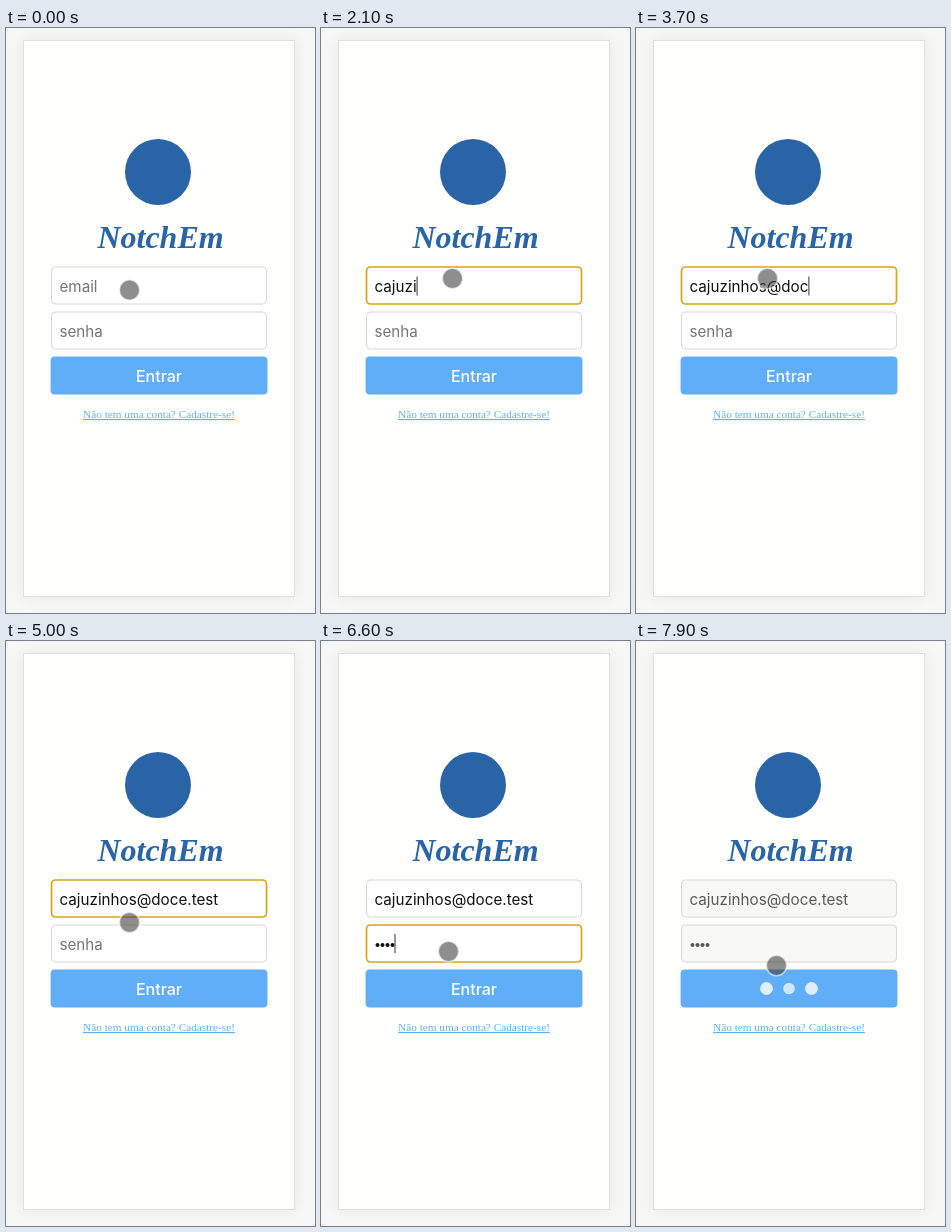
Recreate the animation shown at these times as an HTML page. Size 309 by 585 pixels, loop 8000 ms.

```html
<!DOCTYPE html>
<html lang="pt-BR">
<head>
<meta charset="utf-8">
<title>Login</title>
<style>
  html, body { margin: 0; width: 100%; height: 100%; overflow: hidden; background: #f7f8f6; }
  svg { display: block; width: 100vw; height: 100vh; }
  text { font: 15.2px Inter, sans-serif; }
  .brand { font: italic bold 32px "Liberation Serif", serif; fill: #2864a6; text-anchor: middle; }
  .button { font-size: 16px; font-weight: 500; fill: #fff; text-anchor: middle; }
  .link {
    font: 11.25px "Liberation Serif", serif; fill: #5fb2ee; text-anchor: middle;
    text-decoration: underline 1px; text-underline-offset: 1px;
  }
  .card { fill: #fefefc; stroke: #dfe1df; filter: drop-shadow(0 0 8px rgba(0, 0, 0, .06)); }
  .field { fill: #fff; stroke: #d6d9d7; }
  .field.focus { stroke: #d6a51c; stroke-width: 1.7; }
  .field.off { fill: #f8f8f7; }
</style>
</head>
<body>
<svg viewBox="0 0 309 585">
  <rect class="card" x="17.5" y="12.5" width="271" height="556"/>
  <circle cx="152" cy="144" r="33" fill="#2864a6"/>
  <text class="brand" x="154.5" y="220">NotchEm</text>

  <rect class="field" id="emailBox" x="45.5" y="239" width="215" height="37" rx="4"/>
  <text id="email" x="53.5" y="264"></text>
  <rect class="field" id="passBox" x="45.5" y="284" width="215" height="37" rx="4"/>
  <text id="pass" x="53.5" y="309" fill="#757575">senha</text>
  <g id="bullets"></g>
  <rect id="caret" width="1" height="19" fill="#333"/>

  <rect x="44.6" y="328.6" width="216.8" height="37.8" rx="4" fill="#60adf8"/>
  <text class="button" id="enter" x="153" y="354">Entrar</text>
  <g id="loader" fill="#fff">
    <circle cx="130.5" cy="347.5"/>
    <circle cx="153" cy="347.5"/>
    <circle cx="175.5" cy="347.5"/>
  </g>
  <text class="link" x="153" y="390">Não tem uma conta? Cadastre-se!</text>

  <circle id="pointer" r="10.2" fill="#3c3c3c" fill-opacity=".58"
    stroke="#fff" stroke-width="1.6" stroke-opacity=".6"/>
</svg>
<script>
const LOOP = 8000, TICK = 100, BLINK = 500, SUBMIT = 7300, SPIN = 800;
const ADDRESS = 'cajuzinhos@doce.test';

// Typing speed changes at each key point: [time, characters so far]
const email = { focus: 700, y: 248.5, keys: [[1600, 0], [2100, 6], [2900, 11], [3700, 14], [4300, 20]] };
const pass = { focus: 5500, y: 293, keys: [[5800, 0], [6400, 4]] };

// The pointer rests at each place until the next: [time, x, y]
const rests = [
  [0, 123.5, 262], [500, 131.5, 250.5], [5000, 123.5, 281.5],
  [5300, 123, 298], [6600, 127.5, 310.5], [6700, 141, 338]
];

const $ = id => document.getElementById(id);
const show = (el, on) => el.setAttribute('visibility', on ? 'visible' : 'hidden');
const set = (el, attrs) => Object.entries(attrs).forEach(([k, v]) => el.setAttribute(k, v));
const mix = (a, b, k) => a + (b - a) * k;

function typedCount({ keys }, t) {
  const next = keys.findIndex(key => key[0] > t);
  if (next === 0) return 0;
  if (next < 0) return keys.at(-1)[1];
  const [t0, n0] = keys[next - 1], [t1, n1] = keys[next];
  return Math.floor(mix(n0, n1, (t - t0) / (t1 - t0)) + 1e-6);
}

function caretOn({ focus, keys }, count, t) {
  return t >= focus && t < (count ? keys.at(-1)[0] : focus) + BLINK;
}

for (let i = 0; i < 4; i++) {
  const dot = document.createElementNS('http://www.w3.org/2000/svg', 'circle');
  set(dot, { cx: 56.5 + 5 * i, cy: 304, r: 2 });
  $('bullets').append(dot);
}

function drawFields(t) {
  const typed = typedCount(email, t), secret = typedCount(pass, t);
  const sent = t >= SUBMIT, onPass = t >= pass.focus;
  const ink = sent ? '#595959' : '#111';

  $('email').textContent = typed ? ADDRESS.slice(0, typed) : 'email';
  set($('email'), { fill: typed ? ink : '#757575' });
  show($('pass'), !secret);
  set($('bullets'), { fill: ink });
  [...$('bullets').children].forEach((dot, i) => show(dot, i < secret));

  $('emailBox').classList.toggle('focus', t >= email.focus && !onPass);
  $('passBox').classList.toggle('focus', onPass && !sent);
  for (const id of ['emailBox', 'passBox']) $(id).classList.toggle('off', sent);

  const emailWidth = typed ? $('email').getComputedTextLength() : 0;
  const field = onPass ? pass : email;
  set($('caret'), { x: 53.5 + (onPass ? 5 * secret : emailWidth), y: field.y });
  show($('caret'), caretOn(field, onPass ? secret : typed, t));
}

function drawLoader(t) {
  const sent = t >= SUBMIT;
  show($('enter'), !sent);
  show($('loader'), sent);
  const phase = (t - SUBMIT + LOOP + 40) % SPIN / SPIN;
  const outer = Math.abs(1 - 2 * phase);
  [...$('loader').children].forEach((dot, i) => {
    const k = i === 1 ? 1 - outer : outer;
    set(dot, { r: mix(4.6, 7.6, k), 'fill-opacity': mix(.5, 1, k) });
  });
}

function drawPointer(t) {
  let [, cx, cy] = rests.findLast(rest => rest[0] <= t);
  if (t >= SUBMIT) {
    const k = (t - SUBMIT) / 600;
    cx = mix(138, 140.5, k);
    cy = mix(329, 324.5, k);
  }
  set($('pointer'), { cx, cy });
}

function frame() {
  const t = Math.floor(performance.now() % LOOP / TICK) * TICK;
  drawFields(t);
  drawLoader(t);
  drawPointer(t);
  requestAnimationFrame(frame);
}
frame();
</script>
</body>
</html>
```
